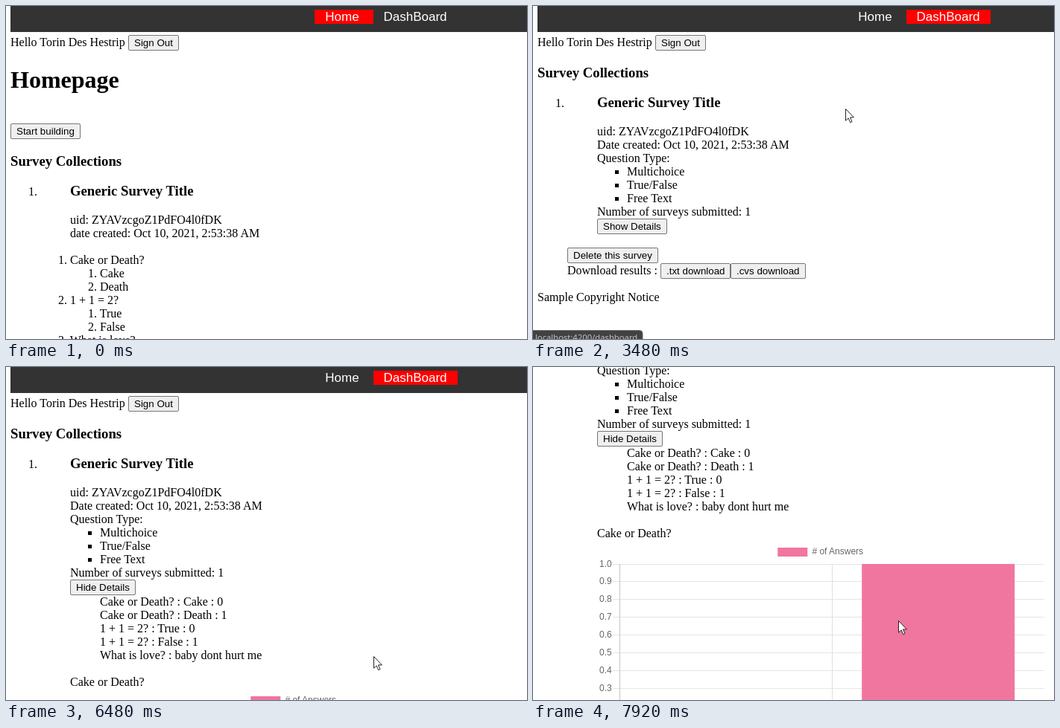
An HTML page that plays this animation: 699 by 448 pixels, repeating every 7.99 s.

```html
<!DOCTYPE html>
<html lang="en">
<head>
<meta charset="utf-8">
<title>Survey dashboard</title>
<style>
  html, body { margin: 0; width: 100%; height: 100%; overflow: hidden; background: #fff; }
  svg { display: block; font: 16px "Liberation Serif", serif; }
  text { white-space: pre; }
  .h1 { font-size: 32px; font-weight: bold; }
  .h3 { font-size: 18.72px; font-weight: bold; }
  .nav { font: 17px "Liberation Sans", sans-serif; fill: #fff; }
  .label { font: 13.333px "Liberation Sans", sans-serif; }
  .chart { font: 12px "Liberation Sans", sans-serif; fill: #666; }
  .status { font: 11.3px "Open Sans", sans-serif; fill: #c9c9c9; }
  .button rect { fill: #efefef; stroke: #767676; }
  .button.hover rect { fill: #e3e3e3; stroke: #4f4f4f; }
</style>
</head>
<body>
<svg id="stage" width="699" height="448" viewBox="0 0 699 448"></svg>
<script>
const LOOP = 7990, PINK = '#f0759f';

const text = (x, y, s, cls = '') => `<text x="${x}" y="${y}" class="${cls}">${s}</text>`;
const lines = (x, y, ...list) => list.map((s, i) => text(x, y + 18 * i, s)).join('');
const rect = (x, y, w, h, fill, id = '') =>
  `<rect id="${id}" x="${x}" y="${y}" width="${w}" height="${h}" fill="${fill}"/>`;
const button = (x, y, w, label, id = '') =>
  `<g id="${id}" class="button"><rect x="${x + .5}" y="${y + .5}" width="${w - 1}" height="20" rx="1.5"/>` +
  text(x + 8, y + 15, label, 'label') + '</g>';
const group = (id, ...parts) => `<g id="${id}">${parts.join('')}</g>`;

const nav = rect(6, 0, 693, 35, '#333') + group('menu',
  rect(414, 5, 79, 19, 'red', 'homeActive'),
  rect(493, 0, 113, 35, '#111', 'dashHover'),
  rect(493, 5, 113, 19, 'red', 'dashActive'),
  text(428.3, 20, 'Home', 'nav'), text(506.5, 20, 'DashBoard', 'nav'));

const home = group('home',
  text(6, 110, 'Homepage', 'h1'),
  button(6, 158, 94, 'Start building'),
  text(6, 215, 'Survey Collections', 'h3'),
  text(30, 255, '1.'), text(86, 255, 'Generic Survey Title', 'h3'),
  lines(86, 293, 'uid: ZYAVzcgoZ1PdFO4l0fDK', 'date created: Oct 10, 2021, 2:53:38 AM'),
  text(70, 347, '1. Cake or Death?'), lines(110, 365, '1. Cake', '2. Death'),
  text(70, 401, '2. 1 + 1 = 2?'), lines(110, 419, '1. True', '2. False'),
  text(70, 455, '3. What is love?'));

const survey = group('survey',
  text(30, 136, '1.'), text(86, 136, 'Generic Survey Title', 'h3'),
  lines(86, 174, 'uid: ZYAVzcgoZ1PdFO4l0fDK', 'Date created: Oct 10, 2021, 2:53:38 AM', 'Question Type:'),
  [221, 239, 257].map(y => rect(110, y, 5, 5, '#000')).join(''),
  lines(126, 228, 'Multichoice', 'True/False', 'Free Text'),
  text(86, 282, 'Number of surveys submitted: 1'));

const closed = group('closed',
  button(86, 286, 94, 'Show Details', 'show'),
  button(46, 325, 122, 'Delete this survey'),
  text(46, 361, 'Download results :'),
  button(171, 346, 94, '.txt download'), button(265, 346, 101, '.cvs download'));

const gridRows = Array.from({ length: 8 }, (_, i) => {
  const y = Math.floor(465 + 23.9 * i);
  return rect(107, y, 579, 1, '#e5e5e5') + text(89, y + 4, (1 - i / 10).toFixed(1), 'chart');
}).join('');

const chart = group('chart',
  rect(328.3, 443, 40, 12, PINK), text(374.4, 452, '# of Answers', 'chart'),
  gridRows,
  rect(116, 465, 1, 240, '#c6c6c6'), rect(401, 465, 1, 240, '#e0e0e0'),
  rect(441.2, 465, 205, 240, PINK));

const open = group('open',
  button(86, 286, 88, 'Hide Details', 'hide'),
  lines(126, 321, 'Cake or Death? : Cake : 0', 'Cake or Death? : Death : 1',
    '1 + 1 = 2? : True : 0', '1 + 1 = 2? : False : 1', 'What is love? : baby dont hurt me'),
  text(86, 429, 'Cake or Death?'), chart);

const $ = id => document.getElementById(id);
$('stage').innerHTML =
  group('page', nav,
    text(6, 54, 'Hello Torin Des Hestrip'), button(164, 39, 68, 'Sign Out'),
    home,
    group('dash', text(6, 96, 'Survey Collections', 'h3'), survey, closed, open,
      '<text id="copyright" x="6">Sample Copyright Notice</text>')) +
  group('status',
    '<rect x="-6" y="436.5" width="153" height="30" rx="4" fill="#424242" stroke="#666"/>',
    text(3, 450, 'localhost:4200/dashboard', 'status')) +
  group('cursor',
    '<path id="arrow" d="M.5.5V16.2L4.1 12.8 6.7 18.7 9 17.7 6.5 11.9H11.4Z" fill="#fff" stroke="#222"/>',
    `<g id="hand"><path d="M-1.5 1.5Q0-.5 1.5 1.5V8Q3.5 6.5 5 8.6 7 7.5 8 9.4 10.5 8.8 10.5 11.5V16Q10.3 18.5 8.5 20.5V23H-.5V20.5L-5.5 14Q-7 11-4.5 11L-1.5 14Z" fill="#fff" stroke="#111"/>
     <path d="M1.5 8V13M5 9V13M8 10V13" stroke="#111" fill="none"/></g>`);

// Progress of a move made in n visible steps; the first is seen at start, the last at end.
const stepped = (t, start, end, n) => {
  const k = Math.floor((t - start) / (end - start) * (n - 1) + .2) + 1;
  return t < start ? 0 : Math.min(k, n) / n;
};
const smooth = u => u * u * (3 - 2 * u);

// Pointer moves: start, end, steps, evenly timed points
const moves = [
  [860, 1200, 6, [[684, 488], [620, 230], [553, 14]]],
  [3280, 4040, 12, [[553, 15], [419, 138], [245, 245], [150, 312]]],
  [4110, 4240, 3, [[150, 312], [109, 301]]],
  [5710, 6480, 12, [[109, 301], [225, 352], [375, 418], [470, 429], [493, 389]]],
  [6550, 6890, 6, [[493, 389], [495, 350]]],
  [7700, 7920, 4, [[495, 350], [490, 341]]],
];

function along(points, u) {
  const p = u * (points.length - 1), i = Math.min(Math.floor(p), points.length - 2);
  return points[i].map((a, axis) => a + (points[i + 1][axis] - a) * (p - i));
}

function pointer(t) {
  const [start, end, n, points] = moves.findLast(m => t >= m[0]) || moves[0];
  return along(points, stepped(t, start, end, n));
}

const show = (id, on) => $(id).setAttribute('display', on ? 'inline' : 'none');
const move = (id, x, y) => $(id).setAttribute('transform', `translate(${x} ${y})`);

function draw(t) {
  const onDash = t >= 2070, loaded = t >= 2530, expanded = t >= 4760;
  const [x, y] = pointer(t);
  const hand = t >= 1200 && t < 3280;

  show('home', !onDash);
  show('dash', onDash);
  show('homeActive', !onDash);
  show('dashActive', onDash);
  show('dashHover', hand && !onDash);
  show('survey', loaded);
  show('closed', loaded && !expanded);
  show('open', expanded);
  show('chart', t >= 4830);
  show('copyright', !expanded);
  $('copyright').setAttribute('y', loaded ? 397 : 134);

  // The menu is centred, so it shifts while the page has no scrollbar.
  move('menu', onDash && !expanded ? 8 : 0, 0);
  const scroll = smooth(stepped(t, 7290, 7500, 4)) + smooth(stepped(t, 7700, 7920, 4));
  move('page', 0, -Math.round(100 * scroll));

  const over = x > 86 && x < 174 && y > 286 && y < 307;
  for (const id of ['show', 'hide']) $(id).classList.toggle('hover', over);

  $('status').setAttribute('opacity', stepped(t, 1400, 1800, 6) ** 2 - stepped(t, 3700, 4040, 6));
  show('cursor', t >= 860);
  show('hand', hand);
  show('arrow', !hand);
  move('cursor', Math.round(x), Math.round(y));
}

function tick() {
  draw(performance.now() % LOOP);
  requestAnimationFrame(tick);
}
tick();
</script>
</body>
</html>
```
